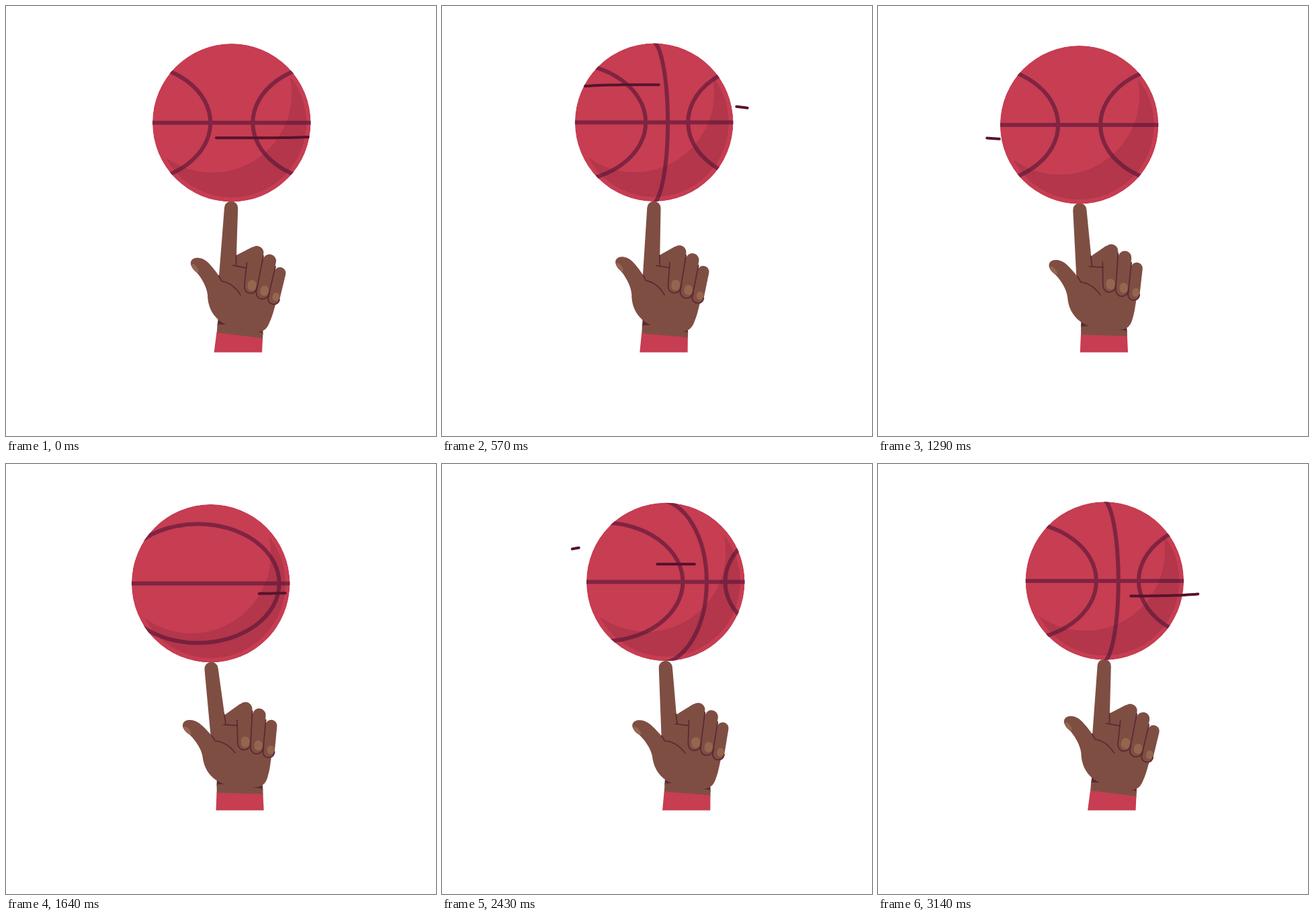
An HTML page that plays this animation: 640x640 px, repeating every 3210 ms.

```html
<!DOCTYPE html>
<html lang="en">
<head>
<meta charset="utf-8">
<title>Spinning ball</title>
<style>
html, body { margin: 0; width: 100%; height: 100%; overflow: hidden; background: #fff; }
svg { display: block; width: 100vw; height: 100vh; }
.skin { fill: #7f4e43; }
.nail { fill: #95664f; }
.red { fill: #c73d52; }
.dark { fill: #5c2a33; }
.crease { fill: none; stroke: #5c2a33; stroke-width: 1.8; stroke-linecap: round; stroke-linejoin: round; }
.finger { stroke: #7f4e43; stroke-linecap: round; }
.seam { fill: none; stroke: #802442; stroke-width: 6; }
.streak { fill: none; stroke: #56132c; stroke-width: 4; stroke-linecap: round; stroke-linejoin: round; }
</style>
</head>
<body>
<svg viewBox="0 0 640 640">
  <defs>
    <clipPath id="ballClip"><circle r="117.8"/></clipPath>
    <clipPath id="floorClip"><rect width="640" height="515.5"/></clipPath>
  </defs>

  <g clip-path="url(#floorClip)">
    <g id="arm">
      <path class="dark" d="M316 460L382 478V489L314 476Z"/>
      <path class="skin" d="M314.3 474L332 474.3Q352 480 371 484L382 487L381.5 496L313 488Z"/>
      <path class="red" d="M313 486L381.5 494.5L380.5 515.5L380 530H307L309 515.5Z"/>
    </g>
  </g>

  <g id="pointer">
    <path class="skin" d="M325 300A10.1 10.1 0 0 1 345.2 301L342.5 386L345 430H320L317 402Z"/>
  </g>

  <g id="thumb">
    <path class="skin" d="M320 406C314 396 307 387 301 381C296 376 290 374 285 374C278 374 274 379 276 385C278 391 284 394 289 402C295 411 299 420 300 429C300 446 306 458 316 467C324 473 332 477 345 482L372 470V410L340 390Z"/>
    <path class="nail" d="M277 384C280 381 284 386 287 392C287 395 286 397 285 396C280 393 276 388 277 384Z"/>
  </g>

  <g id="fist">
    <path class="skin" d="M338 373.5L367 358.5L383 375L400 395L405 410L401.5 443C398 455 396 463 393 469C389 480 384 485 374 485C356 484 340 480 332 476L330 400Z"/>
    <path class="finger" stroke-width="17.4" d="M407.8 397.5L398.6 435.3"/>
    <path class="finger" stroke-width="19.6" d="M392.3 379.3L382.5 426.5"/>
    <path class="finger" stroke-width="20.5" d="M373.3 367.3L364.8 417.5"/>
    <rect class="nail" x="-6.3" y="-8" width="12.6" height="16" rx="6" transform="translate(366 416) rotate(8)"/>
    <rect class="nail" x="-6" y="-7.5" width="12" height="15" rx="5.8" transform="translate(384.7 424) rotate(9)"/>
    <rect class="nail" x="-5" y="-6.3" width="10" height="12.6" rx="4.8" transform="translate(401.8 433) rotate(12)"/>
    <path class="crease" d="M358.5 382L355 414C353.5 424 359 428 365 427.5C370 427 373 424 374 418L383 372"/>
    <path class="crease" d="M374 418L372.5 426C372.5 433 377 436.5 382.5 436C388 435.5 391 432 392 426L401 388"/>
    <path class="crease" d="M392 428L390 435C389.5 441 394 444 398.5 444C403 444 406 441 407 437"/>
    <path class="crease" d="M338 386L358 390"/>
  </g>
  <path id="pointerCrease" class="crease" d="M342.5 371V385"/>
  <path id="thumbCrease" class="crease" d="M317 401Q320 406 321 409Q338 412 349 430"/>

  <g id="ball">
    <g clip-path="url(#ballClip)">
      <circle class="red" r="117.8"/>
      <path class="seam" d="M-120 0H120"/>
      <ellipse id="seamLeft" class="seam" rx="121" ry="88.5"/>
      <ellipse id="seamRight" class="seam" rx="121" ry="88.5"/>
      <path id="seamMid" class="seam"/>
      <path fill="#50142a" fill-opacity=".17" d="M87-69A111 111 0 1 1-98 52A118.5 118.5 0 0 0 87-69Z"/>
    </g>
    <g id="streaks"></g>
  </g>
</svg>
<script>
const LOOP = 3210, FRAMES = 45, STEP = 1000 / 14;
const HALF_TURN = 152.5, REACH = 139, FINGER = 129.8;
const el = id => document.getElementById(id);
const clamp = v => Math.min(1, Math.max(0, v));
const easeOut = v => 1 - (1 - clamp(v)) ** 2;

// height on the ball, bend at the ends, start, duration, delay of the tail
const streaks = [
  [22.5, -3, 42.7, 6.5, 2],
  [-56, 7, 3.6, 6.9, 2.5],
  [-26.5, 5, 7.85, 5, 1.15],
  [22.5, -3, 13.2, 5.2, 1],
  [15.3, -2.5, 22.33, 5.2, 0.4],
  [-56, 7, 27.98, 6, 1.16],
  [-26.5, 5, 31.95, 6.3, 0.85],
  [22.5, -3, 34.9, 6, 0.9]
].map(([y, bend, start, duration, lag]) => {
  const path = document.createElementNS("http://www.w3.org/2000/svg", "path");
  path.setAttribute("class", "streak");
  el("streaks").append(path);
  return { y, bend, start, duration, lag, path };
});

function streakPath(s, frame) {
  const age = (frame - s.start + FRAMES) % FRAMES;
  const head = easeOut(age / s.duration);
  const tail = easeOut((age - s.lag) / s.duration);
  if (tail >= 1 || head <= tail) return "";
  const points = [];
  for (let i = 0; i <= 20; i++) {
    const u = 1 - 2 * (tail + (head - tail) * i / 20);
    points.push((u * REACH).toFixed(2) + " " + (s.y + s.bend * u ** 4).toFixed(2));
  }
  return "M" + points.join("L");
}

// Each half turn of the ball lasts 4.5 frames: 4 moving, the rest held.
function spin(frame) {
  const phase = frame % 9;
  const half = Math.floor(phase / 4.5);
  const turned = HALF_TURN * (half + Math.min((phase - half * 4.5) / 4, 1));
  return turned > HALF_TURN ? 2 * HALF_TURN - turned : -turned;
}

// The middle seam bows out as it nears the rim and is hidden at rest.
function middleSeam(shift) {
  const bow = Math.abs(shift);
  if (bow === 0 || bow > 120) return "";
  const x = -0.2 * shift;
  return `M${x}-122A${bow * 1.27} 122 0 0 ${shift > 0 ? 1 : 0} ${x} 122`;
}

function draw(frame) {
  const theta = frame / FRAMES * 2 * Math.PI;
  const wave = (mean, a, b) => mean + a * Math.cos(theta) + b * Math.sin(theta);
  const place = (id, dx, angle, px, py) =>
    el(id).setAttribute("transform", `translate(${dx} 0) rotate(${angle} ${px} ${py})`);

  const ballX = wave(319.8, 16, -12.4);
  const ballY = wave(175.3, -1.97, -0.72) + 0.58 * Math.cos(2 * theta + 0.54);
  const tipX = wave(319.8, 15.2, -12.4);
  const palmX = wave(344.5, 4.5, -17);
  const pointing = Math.asin((tipX - palmX) / FINGER) * 180 / Math.PI + 6.2;
  const thumbAngle = wave(-3.3, 2.57, 3.06);

  place("arm", wave(347, 0.5, -17.8) - 347, wave(-2.9, 2.7, -0.4), 347, 490);
  const hand = (id, angle) => place(id, palmX - 349, angle, 349, 430);
  hand("pointer", pointing);
  hand("pointerCrease", pointing);
  hand("thumb", thumbAngle);
  hand("thumbCrease", thumbAngle);
  hand("fist", wave(-4.1, 4.08, 0.36));
  el("ball").setAttribute("transform", `translate(${ballX} ${ballY})`);

  const shift = spin(frame);
  el("seamLeft").setAttribute("cx", shift - HALF_TURN);
  el("seamRight").setAttribute("cx", shift + HALF_TURN);
  el("seamMid").setAttribute("d", middleSeam(shift));

  for (const s of streaks) s.path.setAttribute("d", streakPath(s, frame));
}

const origin = performance.now();
function tick() {
  const time = (performance.now() - origin) % LOOP;
  draw(Math.min(FRAMES - 1, Math.floor((time + 5) / STEP)));
  requestAnimationFrame(tick);
}
tick();
</script>
</body>
</html>
```
